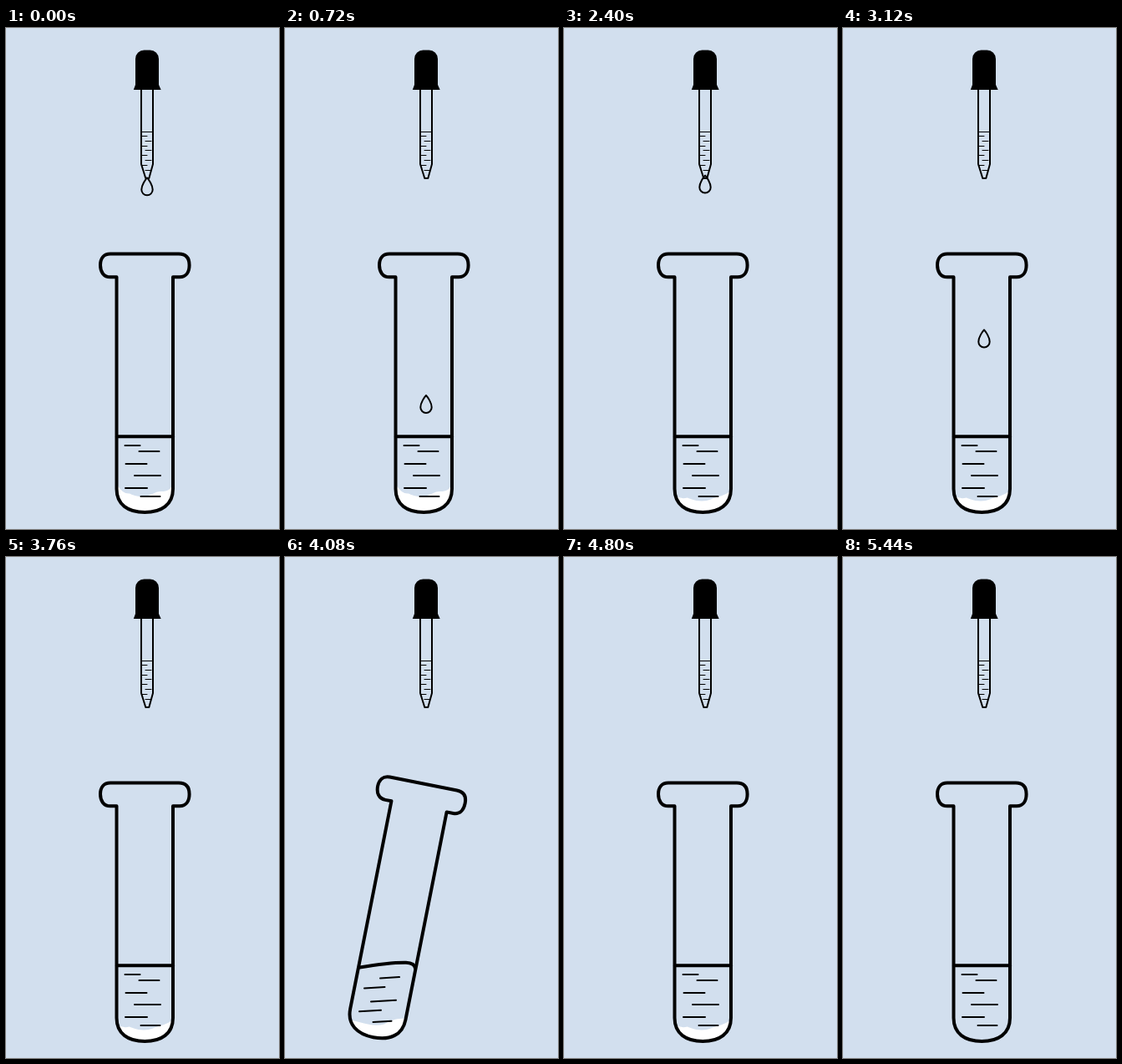
Write an HTML page that moves like this. It is 327x600 px and loops after 5760 ms.

```html
<!DOCTYPE html>
<html lang="en">
<head>
<meta charset="utf-8">
<title>Dropper and test tube</title>
<style>
  html, body { margin: 0; width: 100%; height: 100%; overflow: hidden; background: #d2dfee; }
  svg { display: block; width: 100%; height: 100%; }
  .line { fill: none; stroke: #000; stroke-linecap: round; stroke-linejoin: round; }
</style>
</head>
<body>
<svg viewBox="0 0 327 600">
  <defs>
    <path id="glass" d="M125 270.5H207C216 270.5 219.6 276 219.6 284S216 298.3 208 298.3H200V552C200 571 186 580 166.2 580S132.5 571 132.5 552V298.3H125C117 298.3 113 292 113 284S117 270.5 125 270.5Z"/>
    <clipPath id="inside"><use href="#glass"/></clipPath>
  </defs>

  <g class="line" stroke-width="2">
    <path fill="#000" stroke="none" d="M155 37A10.5 10.5 0 0 1 165.5 26.5H172.5A10.5 10.5 0 0 1 183 37V68L185.7 74H152.8L155 68Z"/>
    <path d="M162 74V163L167.3 180H171.3L176 163V74"/>
    <path id="ticks" stroke-width="1"/>
  </g>

  <g id="tube">
    <g id="body">
      <g clip-path="url(#inside)"><path id="powder" fill="#fff"/></g>
      <use href="#glass" class="line" stroke-width="4"/>
    </g>
    <path id="surface" class="line" stroke-width="4"/>
    <path id="dashes" class="line" stroke-width="2"/>
  </g>

  <path id="drop" class="line" stroke-width="2" d="M0 0C2 2 6.7 9 6.7 14.2A6.7 6.7 0 0 1 -6.7 14.2C-6.7 9 -2 2 0 0Z"/>
</svg>
<script>
const LOOP = 5760, STEP = 80, BEAT = 160;
const LANDINGS = [880, 3440], GROW = 2080, SWING = 4080, UPRIGHT = 4800;
const FALL = [247, 310, 370, 440, 509.5];

const el = id => document.getElementById(id);
const set = (id, name, value) => el(id).setAttribute(name, value);
const clamp = (v, lo, hi) => Math.min(hi, Math.max(lo, v));
const steps = (t, from, size) => Math.floor((t - from) / size);

const dashPath = (rows, slope) =>
  rows.map(([x, y, w]) => `M${x} ${y}l${w} ${w * slope}`).join('');

const dashesUpright = dashPath(
  [[142.5, 500, 18], [159.5, 507, 24], [143.5, 522, 25], [154, 536, 31], [143, 551, 26], [161.5, 561, 23]], 0);
const dashesTilted = dashPath(
  [[114, 504.5, 23], [95, 516.5, 24.5], [103, 532.5, 30], [89, 544.3, 26], [105.5, 557, 22]], -0.06);

// Short marks alternate between the two walls
let ticks = 'M162 124.5H176';
for (let i = 0; i < 8; i++)
  ticks += `M${i % 2 ? 167 : 163} ${129.5 + Math.round(i * 5.8)}h${i % 2 ? 7 : 6}`;
set('ticks', 'd', ticks);

const SURFACE_TILTED = 'M89.5 491.5C110 488 132 485.5 145 485.7Q155 486 156 492.5';
const HEAP_TILTED = 'M128 566Q140 565 146 565.5T158 566Q168 566 176 562Q184 555 190 553L204 549V584H128Z';

// Powder slumps from a high heap (p = 0) to a low one (p = 1)
function heap(p) {
  const y = (high, low) => high + (low - high) * p;
  return `M133 ${y(547, 560)}Q140 ${y(558.5, 565)} 148 ${y(557.5, 562.5)}`
    + `S156 ${y(562, 566.5)} 165 ${y(561, 566.5)}S178 ${y(555, 563)} 186 ${y(555, 561)}`
    + `S196 ${y(553, 556)} 200 ${y(547, 555)}V584H133Z`;
}

// Ripple flips once, then the surface is flat again
function surface(t) {
  const beat = LANDINGS.map(land => steps(t, land, STEP)).find(n => n === 0 || n === 1);
  const swell = beat === undefined ? 0 : beat ? 5 : -5;
  return `M133 489.2q17 ${swell} 33.5 0t33.5 0`;
}

// Tip height and size of the drop, or null while there is none
function dropState(t) {
  const second = t >= GROW;
  const land = LANDINGS[+second];
  if (t >= land + 2 * BEAT) return null;
  if (second && t < land - 4.5 * BEAT) {
    const size = Math.min(1, 0.2 * (1 + steps(t, GROW, STEP)));
    return { y: 174.2 + 2.4 * size, size };
  }
  if (t < land - 4 * BEAT && !second) return { y: 179.4, size: 1 };
  const n = clamp(steps(t, land, BEAT) + 4, 0, 4);
  return { y: FALL[n] - (second && n < 4 ? 8.5 : 0), size: 1 };
}

function render(t) {
  const tilted = t >= SWING && t < UPRIGHT;
  const swing = Math.max(0, steps(t, SWING + STEP, BEAT));
  set('tube', 'transform', tilted && swing % 2 ? 'translate(331.5 0) scale(-1 1)' : '');
  set('body', 'transform', tilted ? 'translate(-5 -6) rotate(11.2 132.5 298)' : '');
  set('surface', 'd', tilted ? SURFACE_TILTED : surface(t));
  set('dashes', 'd', tilted ? dashesTilted : dashesUpright);
  set('powder', 'd', tilted ? HEAP_TILTED : heap(clamp(steps(t, 1280, STEP) / 6, 0, 1)));
  set('powder', 'opacity', clamp(1 - steps(t, UPRIGHT, 2 * BEAT) / 2, 0, 1));

  const drop = dropState(t);
  set('drop', 'visibility', drop ? 'visible' : 'hidden');
  if (drop) {
    set('drop', 'transform', `translate(169 ${drop.y}) scale(${drop.size})`);
    set('drop', 'stroke-width', 2 / drop.size);
  }
}

const start = performance.now();
function frame(now) {
  render(Math.max(0, now - start) % LOOP);
  requestAnimationFrame(frame);
}
render(0);
requestAnimationFrame(frame);
</script>
</body>
</html>
```
